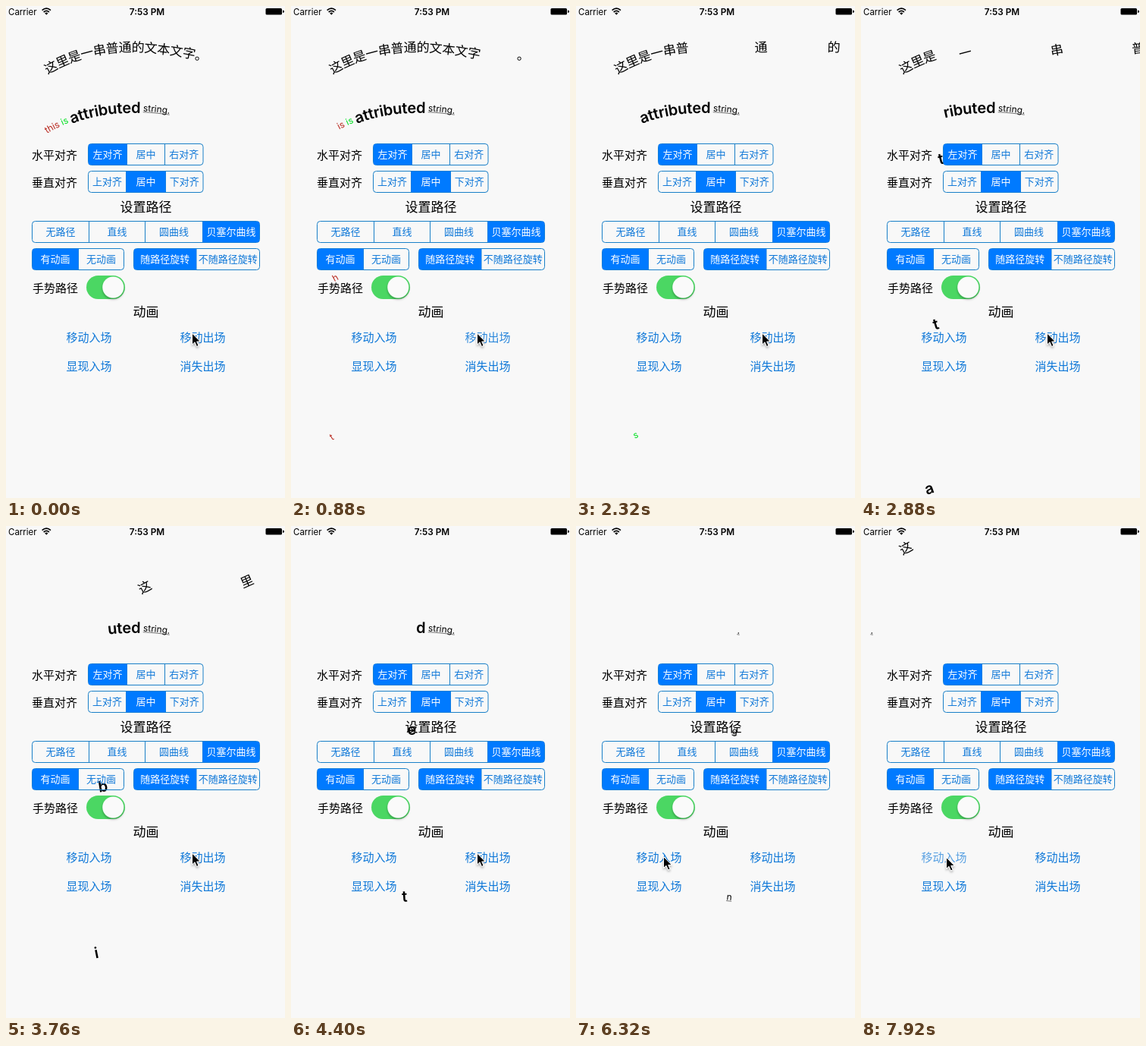
An HTML page for the animation above (8 s loop, 368 by 648 pixels).

```html
<!DOCTYPE html>
<html lang="zh-CN">
<head>
<meta charset="utf-8">
<title>Text along a path</title>
<style>
  html, body { margin: 0; width: 100%; height: 100%; overflow: hidden; background: #f8f8f8; }
  svg { display: block; width: 368px; height: 648px; }
  text { font-family: Inter, "Noto Sans CJK SC", "Noto Sans CJK", sans-serif; white-space: pre; }
</style>
</head>
<body>
<svg id="stage" viewBox="0 0 368 648" xmlns="http://www.w3.org/2000/svg">
  <defs>
    <filter id="soft" x="-40%" y="-40%" width="180%" height="180%">
      <feDropShadow dx="0" dy="2" stdDeviation="1.6" flood-opacity=".3"/>
    </filter>
    <path id="curve" d="M52 85C123 42.4 199 52 270 69"/>
  </defs>
  <rect width="368" height="648" fill="#f8f8f8"/>
  <g id="glyphs"></g>
  <g id="ui"></g>
  <g id="status">
    <text x="3" y="11.8" font-size="11.5">Carrier</text>
    <g fill="none" stroke="#000" stroke-width="1.7">
      <path d="M47.6 5.6Q53.3 .6 59 5.6"/>
      <path d="M49.7 8Q53.3 4.9 56.9 8"/>
    </g>
    <path d="M51.2 9.4Q53.3 7.7 55.4 9.4L53.3 11.7Z"/>
    <text x="186" y="11.8" font-size="11.8" font-weight="600" text-anchor="middle">7:53 PM</text>
    <rect x="342.5" y="3" width="21.5" height="8.5" rx="1.5"/>
    <path d="M365 5.5q2 .3 2 1.8t-2 1.8z"/>
  </g>
  <g id="cursor" filter="url(#soft)">
    <path d="M0 0V15L3.5 11.8L6 17.5L8.6 16.4L6.2 11H10.8Z" stroke="#fff" stroke-width="1"/>
  </g>
</svg>
<script>
const LOOP = 8000;
const OUT = 415, IN = 7592;       // start of the exit and of the entrance
const STEP = 240, DUR = 600;      // delay between glyphs, travel time of one
const BLUE = '#007aff', INK = '#0f78d8', LINE = '#1a80c8';

const $ = id => document.getElementById(id);
const ui = $('ui');
const clamp = v => Math.min(1, Math.max(0, v));
const mix = (a, b, p) => a + (b - a) * p;
const smooth = p => p * p * (3 - 2 * p);

function add(parent, tag, attrs, content) {
  const el = document.createElementNS('http://www.w3.org/2000/svg', tag);
  for (const k in attrs) el.setAttribute(k, attrs[k]);
  if (content) el.textContent = content;
  parent.appendChild(el);
  return el;
}

function label(str, x, cy, size, fill = '#000', anchor = 'middle') {
  return add(ui, 'text', { x, y: cy + size * 0.37, 'font-size': size, fill, 'text-anchor': anchor }, str);
}

function segments(edges, y, names, selected) {
  const h = 28, left = edges[0], right = edges[edges.length - 1];
  const clip = 'clip' + ui.childElementCount;
  const box = { x: left, y, width: right - left, height: h, rx: 4 };
  add(add(ui, 'clipPath', { id: clip }), 'rect', box);
  add(ui, 'rect', { ...box, fill: 'none', stroke: LINE });
  edges.slice(1, -1).forEach(x => add(ui, 'path', { d: `M${x} ${y}v${h}`, stroke: LINE }));
  add(ui, 'rect', {
    x: edges[selected], y, width: edges[selected + 1] - edges[selected], height: h,
    fill: BLUE, 'clip-path': `url(#${clip})`
  });
  names.forEach((name, i) =>
    label(name, (edges[i] + edges[i + 1]) / 2, y + 13.8, 13, i === selected ? '#fff' : INK));
}

label('水平对齐', 34, 196, 15, '#000', 'start');
segments([108.5, 159.5, 209.5, 260], 181.5, ['左对齐', '居中', '右对齐'], 0);
label('垂直对齐', 34, 232, 15, '#000', 'start');
segments([108.5, 158.5, 210.5, 260], 217.5, ['上对齐', '居中', '下对齐'], 1);
label('设置路径', 184.5, 265, 17);
segments([34.5, 109.5, 183.5, 259.5, 334.5], 283.5, ['无路径', '直线', '圆曲线', '贝塞尔曲线'], 3);
segments([34.5, 95.5, 155.5], 319.5, ['有动画', '无动画'], 0);
segments([168.5, 251, 334.5], 319.5, ['随路径旋转', '不随路径旋转'], 0);
label('手势路径', 35, 371, 15, '#000', 'start');
add(ui, 'rect', { x: 106, y: 355, width: 51, height: 31, rx: 15.5, fill: '#4bd763' });
add(ui, 'circle', { cx: 141.3, cy: 370.5, r: 14, fill: '#fafafa', filter: 'url(#soft)' });
label('动画', 184.5, 403, 17);
const enterBtn = label('移动入场', 109.5, 436, 15, INK);
const exitBtn = label('移动出场', 259.5, 436, 15, INK);
label('显现入场', 109.5, 474, 15, INK);
label('消失出场', 259.5, 474, 15, INK);

// Lay styled runs out along the curve, one group per character.
const pen = document.createElement('canvas').getContext('2d');

function layOut(runs, dy) {
  const path = $('curve'), list = [];
  let s = 0;
  for (const { str, size, weight = 400, fill = '#000', underline } of runs) {
    pen.font = `${weight} ${size}px Inter, "Noto Sans CJK SC", "Noto Sans CJK", sans-serif`;
    for (const ch of str) {
      const w = pen.measureText(ch).width, mid = s + w / 2;
      const p = path.getPointAtLength(mid);
      const a = path.getPointAtLength(mid - 1), b = path.getPointAtLength(mid + 1);
      const el = add($('glyphs'), 'g', {});
      const y = size * 0.34;
      add(el, 'text', { y, 'font-size': size, 'font-weight': weight, fill, 'text-anchor': 'middle' }, ch);
      if (underline) add(el, 'path', { d: `M${-w / 2} ${y + 1.3}h${w}`, stroke: fill, 'stroke-width': 0.5 });
      list.push({ el, x: p.x, y: p.y + dy, turn: Math.atan2(b.y - a.y, b.x - a.x) * 180 / Math.PI });
      s += w;
    }
  }
  return list;
}

const plain = layOut([{ str: '这里是一串普通的文本文字。', size: 17 }], 0);
const styled = layOut([
  { str: 'this ', size: 12, fill: '#b8281e' },
  { str: 'is ', size: 12, fill: '#00e020' },
  { str: 'attributed', size: 20, weight: 600 },
  { str: ' ', size: 12 },
  { str: 'string.', size: 12, underline: true }
], 79.5);

const travel = (t, start, order) => clamp((t - start - order * STEP) / DUR);

function place(g, x, y) {
  g.el.setAttribute('transform', `translate(${x.toFixed(2)} ${y.toFixed(2)}) rotate(${g.turn.toFixed(2)})`);
}

// A pressed button dims at once and fades back after release.
function press(btn, t, release) {
  const dim = t > release - 90 ? mix(0.2, 1, clamp((t - release) / 550)) : 1;
  btn.setAttribute('opacity', dim);
}

function draw(t) {
  const entering = t >= IN;
  plain.forEach((g, i) => {
    if (entering) place(g, g.x, mix(-33, g.y, travel(t, IN, i)));
    else place(g, mix(g.x, 388, travel(t, OUT, plain.length - i)), g.y);
  });
  styled.forEach((g, i) => {
    if (entering) place(g, mix(-20, g.x, travel(t, IN, styled.length - i)), g.y);
    else place(g, g.x, mix(g.y, 684, travel(t, OUT, i)));
  });
  press(exitBtn, t, OUT);
  press(enterBtn, t, IN);

  const go = smooth(clamp((t - 5450) / 700));
  const drift = smooth(clamp((t - 6500) / 600));
  const cx = mix(245.5, 115.5, go) - 3 * drift;
  const cy = mix(431, 435.5, go) + drift;
  $('cursor').setAttribute('transform', `translate(${cx} ${cy})`);
}

const began = performance.now();
function tick() {
  draw((performance.now() - began) % LOOP);
  requestAnimationFrame(tick);
}
tick();
</script>
</body>
</html>
```
